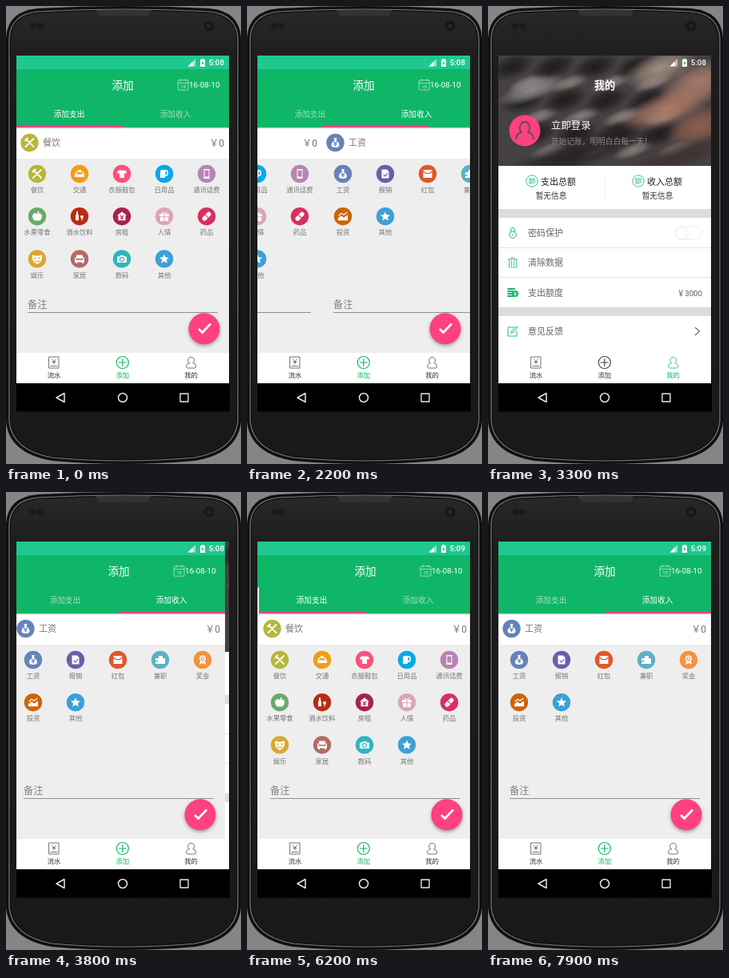
An HTML page with a canvas that plays this animation: 294 px wide and 573 px high, repeating every 8 s.

```html
<!DOCTYPE html>
<html lang="zh-CN">
<head>
<meta charset="utf-8">
<style>
html, body { margin: 0; width: 100%; height: 100%; overflow: hidden; background: #858585; }
canvas { display: block; width: 294px; height: 573px; }
</style>
</head>
<body>
<canvas id="stage"></canvas>
<script>
const canvas = document.getElementById('stage');
const c = canvas.getContext('2d');
const dpr = window.devicePixelRatio || 1;
canvas.width = 294 * dpr;
canvas.height = 573 * dpr;

const LOOP = 8000, TICK = 100, LEFT = 13, PAGE = 266;
const GREEN = '#10b668', PINK = '#ff4081', GREY = '#eeeeee';
// The JP cut centres the full-width colon and exclamation mark
const FONT = 'Roboto, "Noto Sans CJK JP", "Noto Sans CJK SC", sans-serif';

// Glyph parts: f = white fill, s = white line, cf / cs = the same in the disc colour
const YEN = 'M-2-1L0 1L2-1M0 1V4M-2 2H2';
const STAR = 'M0-6L1.8-2L6-1.6L2.8 1.2L3.8 5.4L0 3L-3.8 5.4L-2.8 1.2L-6-1.6L-1.8-2Z';
const expense = [
  ['餐饮', '#b6b63c', { s: 'M-4.5-4.5L5 5M5-5L-5 5M-5.5-2.5L-2.5-5.5', w: 1.8 }],
  ['交通', '#f39c12', { f: 'M-6 1L-4-3H4L6 1V4H-6ZM-2-5H2V-3H-2Z', cf: 'M-3.2-2H3.2L4 .5H-4Z' }],
  ['衣服鞋包', '#ff4f7b', { f: 'M-6-3L-2-5Q0-3 2-5L6-3L5 0L3-1V5H-3V-1L-5 0Z' }],
  ['日用品', '#08a8ea', { f: 'M-5-3Q-5-5-3-5H2Q5-5 5-1Q5 3 2 3H1V5H-5Z', cf: 'M1.5-3H3.2V1H1.5Z' }],
  ['通讯话费', '#b784b4', { f: 'M-3.5-6H3.5V6H-3.5Z', cf: 'M-2.5-4.5H2.5V3.5H-2.5Z' }],
  ['水果零食', '#6aaa6c', { f: 'M0-3C4-6 7-2 5.5 2Q4 6.5 0 5Q-4 6.5-5.5 2C-7-2-4-6 0-3ZM0-3.5Q0-6.5 2.5-6.5Q2.5-4 0-3.5Z' }],
  ['酒水饮料', '#b92b12', { f: 'M-4-6H-2V-3Q-1-2-1 0V5H-5V0Q-5-2-4-3ZM1-1H5Q5 2 3.6 2.5V5H2.4V2.5Q1 2 1-1Z' }],
  ['房租', '#a9214c', { f: 'M0-6L6-1H4.5V5H-4.5V-1H-6Z', cs: YEN }],
  ['人情', '#dca4b6', { f: 'M-6-3H6V0H-6ZM-5 1H5V6H-5Z', s: 'M0-3L-3-5M0-3L3-5', cs: 'M0-3V6' }],
  ['药品', '#d92e60', { s: 'M-2.8 2.8L2.8-2.8', w: 5.4, cs: 'M-2-2L2 2' }],
  ['娱乐', '#d9a830', { f: 'M-6-5Q0-3 6-5Q7 4 0 6.5Q-7 4-6-5Z', cs: 'M-3.5-1H-1.5M1.5-1H3.5M-3 2Q0 5 3 2' }],
  ['家居', '#b36a64', { f: 'M-4-5H4V0H-4ZM-6-2H-4.5V1H4.5V-2H6V4H-6ZM-5 4H-3V5.5H-5ZM3 4H5V5.5H3Z', cs: 'M-4 .5H4' }],
  ['数码', '#2cb5bc', { f: 'M-6-3H-3L-2-4.5H2L3-3H6V4.5H-6Z', cs: 'M-2.5 .7A2.5 2.5 0 1 1 2.5 .7A2.5 2.5 0 1 1-2.5 .7' }],
  ['其他', '#3da0d6', { f: STAR }]
];
const income = [
  ['工资', '#6682ba', { f: 'M-2-6H2L1-3Q5 0 5 3Q5 6 0 6Q-5 6-5 3Q-5 0-1-3Z', cs: YEN }],
  ['报销', '#6560aa', { f: 'M-4.5-5.5H2L4.5-3V5.5H-4.5Z', cs: 'M-2 1L0 3L3-1' }],
  ['红包', '#e1572c', { f: 'M-5.5-5H5.5V5H-5.5Z', cs: 'M-5.5-3Q0 2.5 5.5-3' }],
  ['兼职', '#5cb0c5', { f: 'M-6-2H-2V-5H3V-2H6V5H-6Z', cf: 'M-6 1H-3V2.5H-6Z' }],
  ['奖金', '#f0943e', { f: 'M-4-1.5A4 4 0 1 1 4-1.5A4 4 0 1 1-4-1.5ZM-3 2L-4 6L0 4L4 6L3 2Z', cs: 'M-2-1.5A2 2 0 1 1 2-1.5A2 2 0 1 1-2-1.5' }],
  ['投资', '#cc6506', { f: 'M-6 5V2L-2-1L1 1.5L6-2V5Z', s: 'M-5-1L-2-4L1-2L5-5' }],
  ['其他', '#3da0d6', { f: STAR }]
];

// Moves: time, from, to, ms already spent when the move first shows
const pageMoves = [
  [700, 1, 0, 250], [1600, 0, 1, 29], [2900, 1, 2, 30],
  [3500, 2, 1, 30], [6300, 1, 0, 100], [7100, 0, 1, 130]
];
const tabMoves = [[2200, 0, 1, 127], [5100, 1, 0, 900], [7700, 0, 1, 240]];

const settle = x => 1 - Math.pow(1 - x, 5);

// cubic-bezier(.4, 0, .2, 1)
function fastOut(x) {
  let lo = 0, hi = 1;
  for (let i = 0; i < 20; i++) {
    const u = (lo + hi) / 2, v = 1 - u;
    if (1.2 * v * v * u + .6 * v * u * u + u * u * u < x) lo = u; else hi = u;
  }
  return 3 * (1 - lo) * lo * lo + lo * lo * lo;
}

function valueAt(moves, t, start, span, ease) {
  let v = start;
  for (const [at, from, to, lead] of moves) {
    if (t >= at) v = from + (to - from) * ease(Math.min(1, (t - at + lead) / span));
  }
  return v;
}

function rect(x, y, w, h, color) {
  c.fillStyle = color;
  c.fillRect(x, y, w, h);
}

function disc(x, y, r, color) {
  c.fillStyle = color;
  c.beginPath();
  c.arc(x, y, r, 0, 7);
  c.fill();
}

function text(s, x, y, size, color, align = 'left', weight = 400) {
  c.font = `${weight} ${size}px ${FONT}`;
  c.textAlign = align;
  c.textBaseline = 'alphabetic';
  c.fillStyle = color;
  c.fillText(s, x, y + size * .37);
}

function line(d, x, y, color, w = 1, scale = 1) {
  c.save();
  c.translate(x, y);
  c.scale(scale, scale);
  c.strokeStyle = color;
  c.lineWidth = w;
  c.lineCap = c.lineJoin = 'round';
  c.stroke(new Path2D(d));
  c.restore();
}

function shape(d, x, y, color, scale = 1) {
  c.save();
  c.translate(x, y);
  c.scale(scale, scale);
  c.fillStyle = color;
  c.fill(new Path2D(d));
  c.restore();
}

function box(x, y, w, h, r, fill, stroke, lw = 1) {
  c.beginPath();
  c.roundRect(x, y, w, h, r);
  if (fill) { c.fillStyle = fill; c.fill(); }
  if (stroke) { c.strokeStyle = stroke; c.lineWidth = lw; c.stroke(); }
}

function within(x, y, w, h, dx, draw) {
  c.save();
  c.beginPath();
  c.rect(x, y, w, h);
  c.clip();
  c.translate(dx, 0);
  draw();
  c.restore();
}

function badge([, color, g], x, y, r = 11.2) {
  const k = r / 11.2;
  disc(x, y, r, color);
  if (g.f) shape(g.f, x, y, '#fff', k);
  if (g.s) line(g.s, x, y, '#fff', g.w || 1.2, k);
  if (g.cf) shape(g.cf, x, y, color, k);
  if (g.cs) line(g.cs, x, y, color, 1.1, k);
}

// Phone outline with arched ends, pulled in by d
function outline(d) {
  const l = d, r = 294 - d, top = d, low = 573 - d;
  const p = new Path2D();
  p.moveTo(l, 40);
  p.quadraticCurveTo(l + 2, top + 6, 40, top + 3);
  p.quadraticCurveTo(147, top - 3, 254, top + 3);
  p.quadraticCurveTo(r - 2, top + 6, r, 40);
  p.lineTo(r, 520);
  p.quadraticCurveTo(r - 4, low - 13, 236, low - 4);
  p.quadraticCurveTo(147, low + 4, 58, low - 4);
  p.quadraticCurveTo(l + 4, low - 13, l, 520);
  p.closePath();
  return p;
}

function phone() {
  rect(0, 0, 294, 573, '#858585');
  c.fillStyle = '#101010';
  c.fill(outline(0));
  c.strokeStyle = '#7c7c7c';
  c.lineWidth = 1.2;
  c.stroke(outline(4));
  const g = c.createLinearGradient(0, 0, 0, 573);
  g.addColorStop(0, '#292929');
  g.addColorStop(.12, '#1d1d1d');
  g.addColorStop(1, '#191919');
  c.fillStyle = g;
  c.fill(outline(6));
  shape('M112 5H182L178 12.5H116Z', 0, 0, '#343232');
  disc(34, 25, 4, '#1a1a1a');
  disc(43, 25, 4, '#1a1a1a');
  disc(254, 25, 6.5, '#171717');
  disc(254, 25, 3, '#252525');
}

function header(bottom) {
  rect(LEFT, 62, PAGE, 17, '#1fc88e');
  rect(LEFT, 79, PAGE, bottom - 79, GREEN);
}

function headerShadow(y) {
  rect(LEFT, y, PAGE, 1, 'rgba(0,0,0,.18)');
  rect(LEFT, y + 1, PAGE, 1, 'rgba(0,0,0,.06)');
}

function ledger() {
  rect(LEFT, 118, PAGE, 316, GREY);
  header(119);
  headerShadow(119);
  text('明细', 146.5, 99, 13.6, '#fff', 'center', 500);
  disc(146.4, 162.2, 33.7, GREEN);
  text('月额度：', 127, 156.5, 9.7, '#fff', 'left', 500);
  text('3000.00', 146.5, 168.5, 9.9, '#fff', 'center', 500);
  text('当月支出:', 224, 157, 9.8, '#808080');
  text('3000', 224, 168.5, 9.8, '#808080');
  text('8月10日', 103, 227.5, 8.4, '#666');
  disc(146, 227.5, 2.5, '#dcdcdc');
  text('￥1108', 160, 227.5, 8.4, '#666');
  badge(expense[12], 146.4, 270.2, 8.6);
  text('￥554', 167, 270.5, 9.7, '#666');
  badge(expense[13], 146.4, 314.2, 8.6);
  text('￥554', 167, 314.5, 9.7, '#666');
}

function entries(list) {
  rect(LEFT, 152, PAGE, 39, '#fff');
  badge(list[0], 29.5, 171);
  text(list[0][0], 46, 171, 11, '#777');
  text('￥0', 273, 171.5, 12, '#777', 'right');
  list.forEach((item, i) => {
    const x = 39 + i % 5 * 53, y = 210 + Math.floor(i / 5) * 53.2;
    badge(item, x, y);
    text(item[0], x, y + 20, 8.4, '#777', 'center');
  });
  text('备注', 27, 373.5, 12.2, '#808080');
  rect(27, 383, 238, 1, '#909090');
}

function add(tab, mark) {
  rect(LEFT, 152, PAGE, 282, GREY);
  header(152);
  text('添加', 146, 99, 13.6, '#fff', 'center', 500);
  box(215.2, 92.8, 12.8, 12.4, 1, null, '#a6e0c3', .9);
  line('M0 0H12.8M3-5V-2.5M9.8-5V-2.5', 215.2, 96.5, '#a6e0c3', .9);
  text('15', 221.6, 101, 6, '#d9f3e5', 'center');
  text('16-08-10', 229, 98.5, 9.8, '#fff');
  const picked = tab >= .5 ? 1 : 0;
  ['添加支出', '添加收入'].forEach((s, i) =>
    text(s, 79 + 133 * i, 135, 9.7, i === picked ? '#fff' : '#a3dfbf', 'center', i === picked ? 500 : 400));
  within(LEFT, 152, PAGE, 282, 0, () => {
    [expense, income].forEach((list, i) => {
      const dx = Math.round((i - tab) * PAGE);
      if (Math.abs(dx) < PAGE) within(LEFT + dx, 152, PAGE, 282, dx, () => entries(list));
    });
  });
  headerShadow(152);
  rect(LEFT + Math.round(mark * 133), 150, 133, 2, PINK);
  c.save();
  c.shadowColor = 'rgba(0,0,0,.35)';
  c.shadowBlur = 4 * dpr;
  c.shadowOffsetY = 2 * dpr;
  disc(248, 403.7, 19.5, PINK);
  c.restore();
  c.strokeStyle = '#fff';
  c.lineWidth = 2.7;
  c.stroke(new Path2D('M241 404L245.6 408.5L256 397.5'));
}

function blob(x, y, rx, ry, color) {
  c.save();
  c.translate(x, y);
  c.rotate(-.35);
  c.scale(rx, ry);
  const g = c.createRadialGradient(0, 0, 0, 0, 0, 1);
  g.addColorStop(0, color);
  g.addColorStop(.5, color + 'aa');
  g.addColorStop(1, color + '00');
  disc(0, 0, 1, g);
  c.restore();
}

// Soft dark keys with pale gaps on the left, a warm hand on the right
function photo() {
  rect(LEFT, 62, PAGE, 138, '#454041');
  for (let i = 0; i < 12; i++) {
    const x = 30 + i % 4 * 52 + Math.floor(i / 4) * 14, y = 76 + Math.floor(i / 4) * 42;
    blob(x, y, 30, 15, '#1e1c1e');
    blob(x + 20, y + 20, 28, 9, '#857c79');
  }
  blob(55, 105, 45, 14, '#8d8a8b');
  blob(215, 78, 50, 20, '#a08c80');
  blob(265, 95, 55, 26, '#a57c6b');
  blob(225, 128, 65, 22, '#ad7a67');
  blob(265, 150, 45, 24, '#8e5f50');
  blob(110, 185, 110, 22, '#252224');
  blob(235, 190, 70, 18, '#3d3130');
}

function total(x, s) {
  c.strokeStyle = GREEN;
  c.lineWidth = .8;
  c.beginPath();
  c.arc(x, 219, 7.2, 0, 7);
  c.stroke();
  line('M-3-3H3V0M-3-3V3H0M-1.5-1H1.5M-1.5 1H1M1 3L4 1', x, 219, GREEN, .8);
  text(s, x + 11, 219.5, 11, '#222');
  text('暂无信息', x + 24, 237, 9.7, '#333', 'center');
}

function mine() {
  rect(LEFT, 62, PAGE, 372, '#fff');
  within(LEFT, 62, PAGE, 138, 0, photo);
  text('我的', 146, 99, 13.2, '#fff', 'center', 700);
  disc(46, 156, 19.5, PINK);
  line('M-4 2C-9-3-5-11 0-11S9-3 4 2Q10 3 11 10M-4 2Q-10 3-11 10', 46, 156, '#55505a', 1.8);
  text('立即登录', 79, 149, 12.4, '#fff');
  text('开始记账，明明白白每一天！', 79, 169, 9.7, '#918986');
  total(55, '支出总额');
  total(188, '收入总额');
  rect(145.5, 211, 1, 31, '#ececec');
  rect(LEFT, 254, PAGE, 11, '#dcdcdc');
  rect(LEFT, 377, PAGE, 11, '#dcdcdc');
  rect(LEFT, 302, PAGE, 1, '#d3ebe2');
  rect(LEFT, 339, PAGE, 1, '#d3ebe2');
  ['密码保护', '清除数据', '支出额度'].forEach((s, i) => text(s, 50, 284 + 37.4 * i, 11, '#666'));
  text('意见反馈', 50, 407, 11, '#666');
  line('M-4.2 2.2A4.2 4.2 0 1 1 4.2 2.2A4.2 4.2 0 1 1-4.2 2.2M-2.5-1V-4Q-2.5-6.5 0-6.5T2.5-4V-1M0 1.5V3.5', 31, 284, GREEN, .9);
  line('M-6-4H6M-2-4V-6H2V-4M-4.5-4V6H4.5V-4M-1.5-2V4M1.5-2V4', 31, 321, GREEN, .7);
  line('M-6-4H2M-6-1H0M-6 2H-1M-6 5H0', 31, 358, GREEN, 1.8);
  disc(34, 360, 4, GREEN);
  line('M-1.5-2L0 0L1.5-2M0 0V2M-1.5 1H1.5', 34, 360, '#fff', .8);
  line('M2-5H-6V6H5V0M-2 2L-1-1L5-6L6-5L1 1Z', 31, 407, GREEN, .9);
  box(234.5, 276, 33, 16, 8, '#fff', '#ededed');
  c.beginPath();
  c.arc(242.5, 284, 8, 0, 7);
  c.stroke();
  text('￥3000', 268, 359, 9.7, '#555', 'right');
  line('M-2.5-4.5L2.5 0L-2.5 4.5', 262, 407, '#777', 1.5);
}

function navBar(active) {
  rect(LEFT, 434, PAGE, 39, '#fff');
  const glyphs = [
    'M-6-7H6V7H-6ZM-2.5-4L0-1L2.5-4M0-1V2M-2-.5H2M-4 4.5H4',
    'M-7.5 0A7.5 7.5 0 1 1 7.5 0A7.5 7.5 0 1 1-7.5 0M-4.5 0H4.5M0-4.5V4.5',
    'M-2.2 .6A4 4 0 1 1 2.2 .6Q6 1 6 5Q6 7 4 7H-4Q-6 7-6 5Q-6 1-2.2 .6'
  ];
  ['流水', '添加', '我的'].forEach((s, i) => {
    const x = 60 + 85.8 * i, on = i === active;
    line(glyphs[i], x, 446, on ? GREEN : '#444', i === 1 ? 1.2 : .75);
    text(s, x, 462, 8.4, on ? GREEN : '#333', 'center');
  });
}

function statusBar(clock) {
  shape('M-5 4.5L4.5-5V4.5Z', 232.5, 71, 'rgba(255,255,255,.55)');
  shape('M-5 4.5L1-1.5V4.5Z', 232.5, 71, '#fff');
  shape('M-3-4H-1.5V-5H1.5V-4H3V5H-3Z', 246, 71, '#fff');
  shape('M.8-3L-1.8 1H0L-.8 4L1.8 0H0Z', 246, 71, '#1fb580');
  text(clock, 273, 70.7, 9.8, '#fff', 'right', 500);
}

function softKeys() {
  rect(LEFT, 472, 267, 35.5, '#000');
  line('M5-5.5V5.5L-5 0Z', 68, 490, '#e6e6e6', 1.5);
  line('M-5.5 0A5.5 5.5 0 1 1 5.5 0A5.5 5.5 0 1 1-5.5 0', 146, 490, '#e6e6e6', 1.5);
  line('M-5-5H5V5H-5Z', 223, 490, '#e6e6e6', 1.4);
}

function render(t) {
  let pos = valueAt(pageMoves, t, 1, 600, settle);
  // Slow start of a finger drag
  if (t >= 5800 && t < 6300) pos = 1 - (t - 5700) / 250 / PAGE;
  const tab = valueAt(tabMoves, t, 0, 600, settle);
  const mark = valueAt(tabMoves, t, 0, 320, fastOut);

  c.setTransform(dpr, 0, 0, dpr, 0, 0);
  phone();
  within(LEFT, 62, PAGE, 372, 0, () => {
    [ledger, () => add(tab, mark), mine].forEach((page, i) => {
      const dx = Math.round((i - pos) * PAGE);
      if (Math.abs(dx) < PAGE) within(LEFT + dx, 62, PAGE, 372, dx, page);
    });
  });
  navBar(Math.round(pos));
  statusBar(t < 5100 ? '5:08' : '5:09');
  softKeys();
}

const began = performance.now();
function loop(now) {
  const t = Math.max(0, now - began) % LOOP;
  render(Math.floor(t / TICK) * TICK);
  requestAnimationFrame(loop);
}
render(0);
requestAnimationFrame(loop);
</script>
</body>
</html>
```
